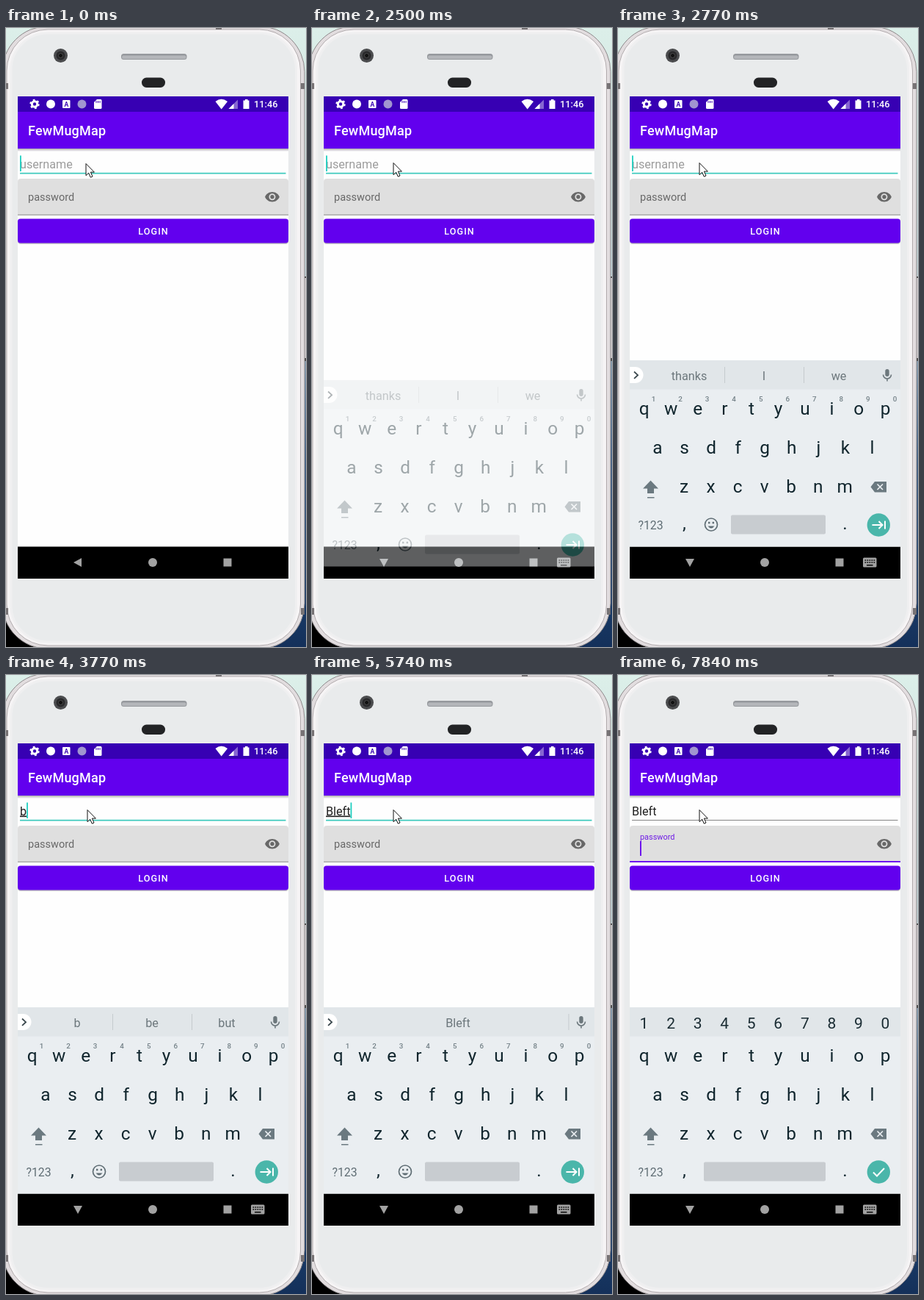
Write an HTML page that moves like this. It is 409 px wide and 842 px high and loops after 8000 ms.

```html
<!DOCTYPE html>
<html lang="en">
<head>
<meta charset="utf-8">
<title>Login screen</title>
<style>
  html, body { margin: 0; width: 100%; height: 100%; overflow: hidden; }
  svg { display: block; width: 100%; height: 100%; }
  text { font-family: Roboto, sans-serif; }
  .mid { text-anchor: middle; }
  .medium { font-weight: 500; fill: #fff; }
  #keys text { font-size: 24.4px; fill: #10252d; }
  #hints text { font-size: 9.8px; font-weight: 500; fill: #738087; }
  #digits text { font-size: 21px; fill: #1a2c33; }
  #words text { font-size: 16.2px; fill: #6c777c; }
</style>
</head>
<body>
<svg viewBox="0 0 409 842">
  <defs>
    <linearGradient id="desk" x2="0" y2="1">
      <stop offset="0" stop-color="#dcefe9"/><stop offset=".4" stop-color="#c5d6da"/>
      <stop offset=".7" stop-color="#3f6088"/><stop offset=".9" stop-color="#1c3f6c"/><stop offset="1" stop-color="#14305a"/>
    </linearGradient>
    <linearGradient id="shade" x2="0" y2="1">
      <stop offset="0" stop-opacity=".32"/><stop offset="1" stop-opacity="0"/>
    </linearGradient>
  </defs>

  <!-- desk and phone body, whose left edge lies outside the stage -->
  <rect width="409" height="842" fill="url(#desk)"/>
  <path d="M0 780h60v62H0z"/>
  <path d="M407 338h2v115h-2z" fill="#d5d1d3"/>
  <path d="M407 338h2v2h-2zM407 449h2v4h-2z" fill="#444"/>
  <rect x="-5" y="-2.500" width="412" height="847" rx="62" fill="#e2dddf" stroke="#8d888a"/>
  <rect x="1" y="2" width="400.500" height="838" rx="56" fill="#f6f4f5" stroke="#b1abad"/>
  <rect x="7" y="7" width="388.500" height="828" rx="50" fill="#e9ebec" stroke="#efeff0" stroke-width="3"/>
  <path d="M0 75h3v8H0zM402 75h5v8h-5zM0 789h3v9H0zM402 789h5v9h-5zM286 0h8v2h-8z" fill="#777375"/>
  <circle cx="74.500" cy="37.500" r="9.500" fill="#4b4c4e"/>
  <circle cx="74.500" cy="37.500" r="6" fill="#29292b"/>
  <circle cx="74.500" cy="37.500" r="3" fill="#111" stroke="#555" stroke-width=".8"/>
  <rect x="157" y="35" width="89.500" height="8" rx="3.500" fill="#96999d"/>
  <rect x="158" y="37.500" width="87.500" height="4.500" rx="2.200" fill="#b4b6ba"/>
  <rect x="185" y="67.500" width="32" height="13.500" rx="6.500" fill="#222325"/>

  <!-- status bar and app bar -->
  <path d="M16 93h369v656H16z" fill="#fefefe"/>
  <path d="M16 93h369v21H16z" fill="#3700b3"/>
  <path d="M16 114h369v50H16z" fill="#6200ee"/>
  <path d="M16 164h369v4H16z" fill="url(#shade)"/>
  <g fill="none" stroke="#fff">
    <circle cx="39" cy="103.500" r="3.700" stroke-width="3"/>
    <circle cx="39" cy="103.500" r="5.700" stroke-width="2" stroke-dasharray="2.700 3.270"/>
  </g>
  <circle cx="61" cy="103.500" r="6" fill="#fff"/>
  <rect x="77" y="98" width="10.500" height="11" rx="1" fill="#fff"/>
  <text x="82.300" y="106.700" class="mid" font-size="8.500" font-weight="700" fill="#3700b3">A</text>
  <circle cx="103.500" cy="103.500" r="6" fill="#a195d0"/>
  <path d="M124 97h5q1.500 0 1.500 1.500v10q0 1.500-1.500 1.500h-7.500q-1.500 0-1.500-1.500V101z" fill="#fff"/>
  <path d="M123 99v3M125.500 99v3M128 99v3" stroke="#3700b3"/>
  <path d="M285.500 100q8-6.500 16.500 0L293.700 110.500z" fill="#fff"/>
  <path d="M316 97.500V110H303.500z" fill="#fff" opacity=".4"/>
  <path d="M310.500 103V110H303.500z" fill="#fff"/>
  <path d="M326 97h3.500v1.500h2V110h-8V98.500h2.500z" fill="#fff"/>
  <text x="338" y="108" class="medium" font-size="12.800">11:46</text>
  <text x="30" y="146" class="medium" font-size="18" letter-spacing=".22">FewMugMap</text>

  <!-- form -->
  <text id="hint" x="19" y="190.500" font-size="16.160" fill="#9c9c9c">username</text>
  <text id="name" x="19" y="190.500" font-size="16.160" fill="#1f1f1f"></text>
  <rect id="nameLine" x="19" width="362.500"/>
  <path d="M16 254.500V209q0-4 4-4h361q4 0 4 4v45.500z" fill="#dfdfdf"/>
  <rect id="passLine" x="16" width="369"/>
  <text id="label" x="30">password</text>
  <path transform="translate(352.200 219) scale(.898)" fill="#686868" fill-rule="evenodd" d="M12 4.500C7 4.500 2.730 7.610 1 12c1.730 4.390 6 7.500 11 7.500s9.270-3.110 11-7.500c-1.730-4.390-6-7.500-11-7.500zM12 17a5 5 0 1 1 0-10 5 5 0 0 1 0 10zM12 9a3 3 0 1 0 0 6 3 3 0 0 0 0-6z"/>
  <rect id="caret" width="1.800"/>
  <rect x="16" y="261.500" width="369" height="32.500" rx="4" opacity=".22"/>
  <rect x="16" y="259.600" width="369" height="32.800" rx="3.600" fill="#6200ee"/>
  <text x="201" y="281" class="mid medium" font-size="12.570" letter-spacing="1.120">LOGIN</text>

  <!-- navigation bar -->
  <path d="M16 705.600h369V749H16z"/>
  <g fill="#a2a2a2">
    <path id="back"/>
    <circle cx="200" cy="727" r="6"/>
    <path d="M296.500 721.500h11v11h-11z"/>
    <g id="switcher">
      <rect x="334" y="720.500" width="18.500" height="13" rx="1.500"/>
      <path d="M336.500 724h14M336.500 727h14" stroke="#000" stroke-width="1.600" stroke-dasharray="1.700 1.300"/>
      <path d="M339 730.700h8.500" stroke="#000" stroke-width="1.500"/>
    </g>
  </g>

  <!-- keyboard -->
  <g id="keyboard">
    <path d="M16 452h369v253.600H16z" fill="#eaeef1"/>
    <path d="M16 452h369v39.500H16z" fill="#e1e6e9"/>
    <g id="digits"></g>
    <g id="words">
      <path d="M16 461h7.500a11 11 0 0 1 0 22H16z" fill="#fff"/>
      <path d="M22 467.500l5 4.700-5 4.700" fill="none" stroke="#39464c" stroke-width="1.800"/>
      <path id="dividers" stroke="#c5cbce"/>
      <rect x="364.300" y="464" width="5.400" height="10" rx="2.700" fill="#6c777c"/>
      <path d="M361.500 471.500a5.500 5.500 0 0 0 11 0M367 477v3.500" fill="none" stroke="#6c777c" stroke-width="1.600"/>
    </g>
    <g id="hints"></g>
    <g id="keys"></g>
    <path d="M44.500 615.500l10.500 11h-6V633h-9v-6.500h-6zM40 638h9.500v1.500H40z" fill="#6b7980"/>
    <path d="M344.500 624.300l5.500-7.300h16v14.500h-16z" fill="#6b7980"/>
    <path d="M353.500 620.500l7.500 7.500m0-7.500l-7.500 7.500" stroke="#eaeef1" stroke-width="1.700"/>
    <text x="44.500" y="681.500" class="mid" font-size="15.800" fill="#5f6d74">?123</text>
    <g id="emoji" fill="none" stroke="#5f6d74" stroke-width="1.700">
      <circle cx="127" cy="675.500" r="8.500"/>
      <path d="M122.500 677.500q4.500 6 9 0z" fill="#5f6d74" stroke="none"/>
      <path d="M123 673h2.400M128.600 673h2.400" stroke-width="2.400"/>
    </g>
    <rect id="space" y="662.500" height="26" rx="2" fill="#c8ccd0"/>
    <circle cx="355.300" cy="676" r="15.700" fill="#4ab6aa"/>
    <path id="enter" fill="none" stroke="#fff" stroke-width="2"/>
  </g>

  <path id="pointer" d="M0 0v16.200l3.700-3.500 2.600 6 2.700-1.200-2.600-5.900h5z" fill="#fff" stroke="#111" stroke-linejoin="round"/>
</svg>
<script>
const $ = id => document.getElementById(id);
const set = (el, attrs) => { for (const k in attrs) el.setAttribute(k, attrs[k]); };

function addText(parent, x, y, string) {
  const el = document.createElementNS("http://www.w3.org/2000/svg", "text");
  set(el, { x, y, class: "mid" });
  el.textContent = string;
  return parent.appendChild(el);
}

const PITCH = 36.55;
const addRow = (parent, x, y, string) =>
  [...string].forEach((c, i) => addText(parent, x + i * PITCH, y, c));

addRow($("keys"), 35.7, 526.3, "qwertyuiop");
addRow($("keys"), 54, 579, "asdfghjkl");
addRow($("keys"), 90, 632, "zxcvbnm");
addText($("keys"), 90.5, 682, ",");
addText($("keys"), 309.5, 682, ".");
addRow($("hints"), 48.5, 508, "1234567890");
addRow($("digits"), 35.5, 480.5, "1234567890");
const words = [97, 199, 301].map(x => addText($("words"), x, 478.7, ""));

const DURATION = 8000;
const NEXT_WORDS = ["thanks", "I", "we"];
const START = {
  caret: true, pointer: [109, 184.5], name: "", words: NEXT_WORDS,
  password: false, floated: false, nav: false, alpha: 0, drop: 0
};
const typed = (name, ...words) => ({ name, words, caret: true });
const on = { caret: true }, off = { caret: false };

// Each entry changes part of the state from its time onwards.
const TIMELINE = [
  [150, off], [710, on], [1140, off], [1670, on],
  [2230, { caret: false, pointer: [111, 183.5] }],
  [2380, on],
  [2500, { nav: true, alpha: .4, drop: 27 }],
  [2620, { alpha: .8, drop: 13.5 }],
  [2770, { alpha: 1, drop: 0 }],
  [3210, off], [3640, on],
  [3770, typed("b", "b", "be", "but")],
  [4200, off], [4630, on],
  [4760, typed("", ...NEXT_WORDS)],
  [5040, typed("B", "B", "Be", "But")],
  [5340, typed("Bl", "Bl", "Blue", "Black")],
  [5470, typed("Ble", "Ble", "Bless", "Blend")],
  [5620, typed("Blef", "", "Blef", "")],
  [5740, typed("Bleft", "", "Bleft", "")],
  [6270, off], [6700, on],
  [6850, { password: true }],
  [6980, { floated: true }],
  [7260, off], [7840, on]
];

function draw(time) {
  const s = Object.assign({}, START, ...TIMELINE.filter(([at]) => at <= time).map(([, patch]) => patch));
  const show = (id, visible) => set($(id), { visibility: visible ? "visible" : "hidden" });

  set($("pointer"), { transform: `translate(${s.pointer})` });
  show("hint", !s.name);
  $("name").textContent = s.name;
  set($("name"), { "text-decoration": s.password ? "none" : "underline" });
  set($("nameLine"), s.password
    ? { y: 197, height: 1, fill: "#858585" }
    : { y: 196.8, height: 1.7, fill: "#3ccabd" });

  set($("passLine"), s.password
    ? { y: 253, height: 1.8, fill: "#6200ee" }
    : { y: 253.7, height: 1, fill: "#8a8a8a" });
  set($("label"), s.floated
    ? { y: 223.5, "font-size": 10.9, fill: "#6f1be6" }
    : { y: 234.5, "font-size": 14.5, fill: "#686868" });

  show("caret", s.caret);
  const nameEnd = 19 + (s.name ? $("name").getComputedTextLength() : 0);
  set($("caret"), s.password
    ? { x: 30, y: 226, height: 20, fill: "#6200ee" }
    : { x: nameEnd, y: 173.5, height: 21.5, fill: "#1fcfc0" });

  set($("back"), { d: s.nav ? "M92 722h12l-6 11z" : "M92 727l11-6v12z" });
  show("switcher", s.nav);

  set($("keyboard"), { opacity: s.alpha, transform: `translate(0 ${s.drop})` });
  words.forEach((el, i) => el.textContent = s.words[i]);
  set($("dividers"), { d: s.words[0] ? "M145.500 461v22M253.500 461v22" : "M350 461v22" });
  for (const id of ["words", "hints", "emoji"]) show(id, !s.floated);
  show("digits", s.floated);
  const spaceX = s.floated ? 117 : 154;
  set($("space"), { x: spaceX, width: 283 - spaceX });
  set($("enter"), { d: s.floated
    ? "M348 676.500l5 5 10-10.500"
    : "M346.500 676h13.500M355.500 671l5 5-5 5M364 670.500v11" });
}

function tick() {
  draw(performance.now() % DURATION);
  requestAnimationFrame(tick);
}
tick();
</script>
</body>
</html>
```
